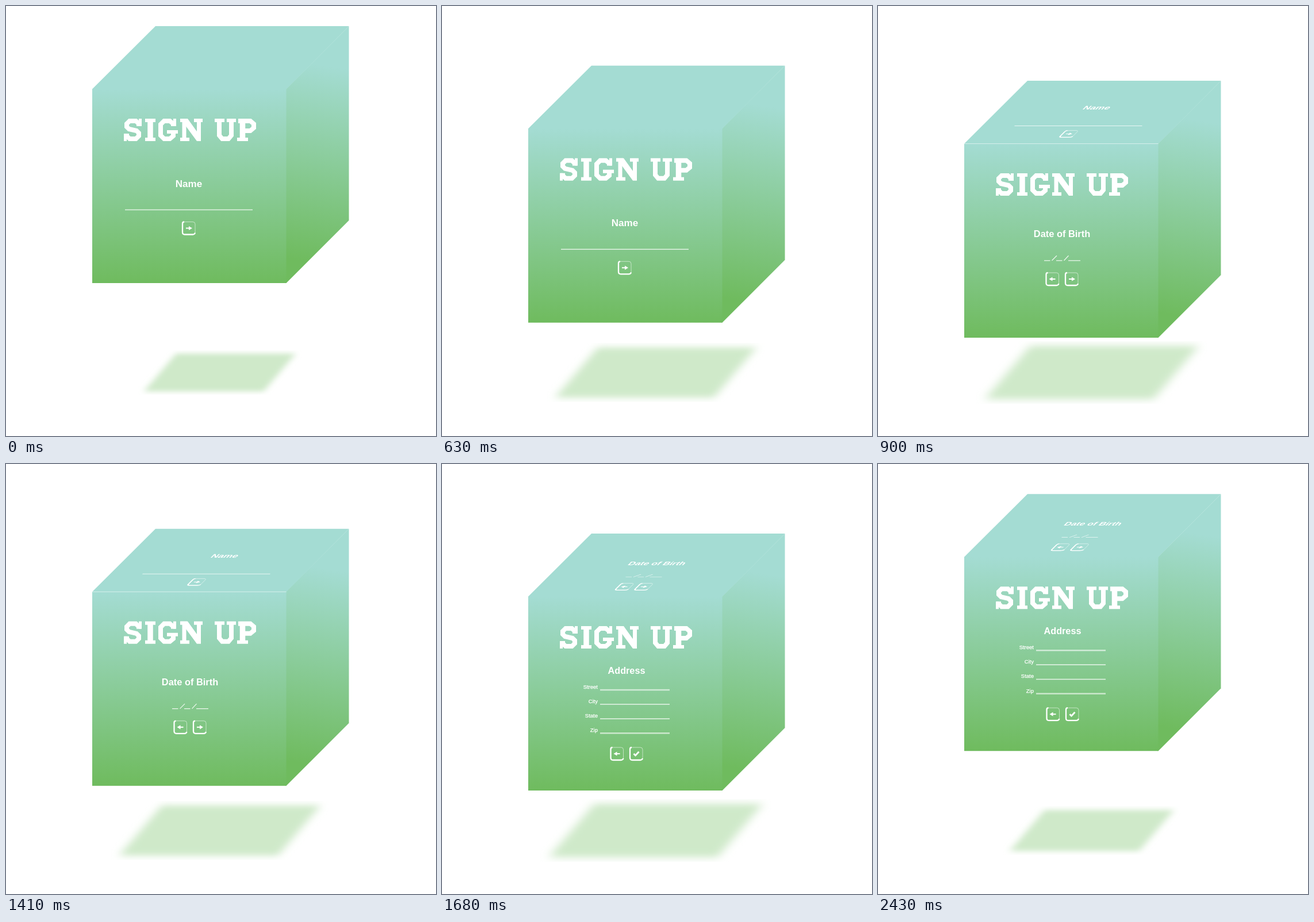
Write an HTML page that moves like this. It is 748 by 748 pixels and loops after 2.46 s.

```html
<!DOCTYPE html>
<html lang="en">
<head>
<meta charset="utf-8">
<title>Sign up cube</title>
<style>
  html, body { margin: 0; width: 100%; height: 100%; overflow: hidden; background: #fff; }
  svg { display: block; width: 100vw; height: 100vh; }
  text { font-family: "Liberation Sans", Arial, sans-serif; fill: #fff; }
  .title { font-weight: bold; text-anchor: middle; }
  .label { font-size: 9.5px; text-anchor: end; stroke: #fff; stroke-width: .25; }
  .ink { fill: none; stroke: #fff; }
</style>
</head>
<body>
<svg viewBox="0 0 748 748">
  <defs>
    <linearGradient id="frontFill" x1="0" y1="0" x2="0" y2="1">
      <stop offset="0" stop-color="#a4dcd3"/>
      <stop offset="1" stop-color="#6fbb5e"/>
    </linearGradient>
    <linearGradient id="sideFill" gradientUnits="userSpaceOnUse" x1="596" y1="-34.5" x2="545.4" y2="303">
      <stop offset="0" stop-color="#a4dcd3"/>
      <stop offset="1" stop-color="#6fbb5e"/>
    </linearGradient>
    <filter id="soft" filterUnits="userSpaceOnUse" x="-143" y="-38.5" width="286" height="77">
      <feGaussianBlur stdDeviation="6 4.5"/>
    </filter>
  </defs>

  <g id="shadow">
    <path d="M-76 -33H132L76 33H-132Z" fill="#cfe9c9" filter="url(#soft)"/>
  </g>

  <g id="cube">
    <path d="M486.5 0.5L596.5 -109.5V228.5L487.5 337.5H486.5Z" fill="url(#sideFill)"/>
    <path d="M150 0L260 -109.5H596.5L487.5 0V1H150Z" fill="#a4dcd3"/>
    <rect x="150" width="337.5" height="337.5" fill="url(#frontFill)"/>
    <path id="seam" class="ink" d="M150 0H487.5" stroke-opacity=".55"/>

    <!-- slab lettering, 39 units tall -->
    <g class="ink" role="img" aria-label="SIGN UP" transform="translate(205 51.5)">
      <g stroke-width="8">
        <path d="M26 13V9L21 4H10L5 9V14L9 18L22 21L26 25V30L21 35H10L5 30V26"/>
        <path d="M86 13V9L80 4H70L64 10V29L70 35H80L86 30V24"/>
        <path d="M166 2V29L171 35H182L187 29V2"/>
        <path d="M199 4H220L226 9V16L220 21H206"/>
        <path d="M105 3V36M130.5 3V36" stroke-width="7"/>
        <path d="M46 3V36M206.5 3V36" stroke-width="9.5"/>
      </g>
      <path d="M28.5 0V13M2.5 26V39M88.5 0V13" stroke-width="5"/>
      <path d="M37 3H55M37 36H55M75 23H94M98 3H110M98 36H114M122 3H137M158 3H175M179 3H195M197 36H216" stroke-width="6"/>
      <path d="M98 0H111L134 32V39H127L102 5Z" fill="#fff" stroke="none"/>
    </g>

    <g id="content"></g>
  </g>
</svg>
<script>
const STEP = 30, STEPS = 82, RAMP = 5;
const PEAKS = [0, 25, 51, 82];
const LOW = 230.5, RISE = 86, NUDGE = 9;

const el = id => document.getElementById(id);
const ink = (d, width, extra = "") => `<path class="ink" d="${d}" stroke-width="${width}" ${extra}/>`;
const title = (text, size) => `<text class="title" y="6" font-size="${size}">${text}</text>`;

function button(mark) {
  const arrow = ink("M-5 0H2", 2) + '<path d="M0 -3.6L6 0L0 3.6Z" fill="#fff"/>';
  const marks = {
    next: arrow,
    back: `<g transform="scale(-1 1)">${arrow}</g>`,
    done: ink("M-4.5 0L-1.5 3L4.5 -3.5", 2.8)
  };
  return '<rect class="ink" x="-11" y="-11" width="22" height="22" rx="4" stroke-opacity=".55"/>' +
    ink("M-8 -11Q-11 -11 -11 -8V7Q-11 11 -7 11H7Q10 11 11 8", 2.3) + marks[mark];
}

const dateBlank = ink("M-31.5 0H-21M-18 0L-9.5 -8.5M-10.5 0H0M3 0L11 -8.5M10.5 0H31.5", 1.3, 'stroke-opacity=".85"');

// each part: markup, place on the front, place on the top
const nameParts = [
  [title("Name", 17), 318, 164, 381, -62.5],
  [ink("M-111 0H111", 1.6, 'stroke-opacity=".75"'), 318, 210, 348.5, -31],
  [button("next"), 318, 242, 332, -17]
];
const dateParts = [
  [title("Date of Birth", 16.4), 320, 156.5, 374.5, -58],
  [dateBlank, 320.5, 203.3, 351, -34],
  [button("back"), 303.5, 235.5, 317.5, -17],
  [button("next"), 337, 235.5, 351, -17]
];
const addressParts = [
  [title("Address", 16.2), 321, 128.5],
  ...["Street", "City", "State", "Zip"].map((text, i) => [
    `<text class="label" x="-4">${text}</text>` +
      ink("M0 2H121", i % 3 ? 1.5 : 2.4, `stroke-opacity="${i % 3 ? .8 : .6}"`),
    275, 160.5 + 25.1 * i
  ]),
  [button("back"), 304.5, 273.5],
  [button("done"), 338, 273.5]
];

const onFront = parts => parts.map(([body, x, y]) =>
  `<g transform="translate(${x} ${y})">${body}</g>`).join("");
const onTop = parts => parts.map(([body, , , x, y]) =>
  `<g transform="matrix(1 0 -.54 .54 ${x} ${y})">${body}</g>`).join("");

const faces = [
  onFront(nameParts),
  onTop(nameParts) + onFront(dateParts),
  onTop(dateParts) + onFront(addressParts)
];
let shown = -1;

function draw(time) {
  const n = Math.floor(time / STEP) % STEPS;
  const face = n < PEAKS[1] ? 0 : n < PEAKS[2] ? 1 : 2;
  const lift = Math.max(0, ...PEAKS.map(peak => 1 - Math.abs(n - peak) / RAMP));
  const y = LOW - RISE * lift + (face === 1 ? NUDGE : 0);

  el("cube").setAttribute("transform", `translate(0 ${y})`);
  el("shadow").setAttribute("transform", `translate(372 637.5) scale(${1.41 - .41 * lift})`);
  if (face !== shown) {
    el("content").innerHTML = faces[face];
    el("seam").style.display = face === 1 ? "" : "none";
    shown = face;
  }
}

const start = performance.now();
function tick() {
  draw(performance.now() - start);
  requestAnimationFrame(tick);
}
tick();
</script>
</body>
</html>
```
